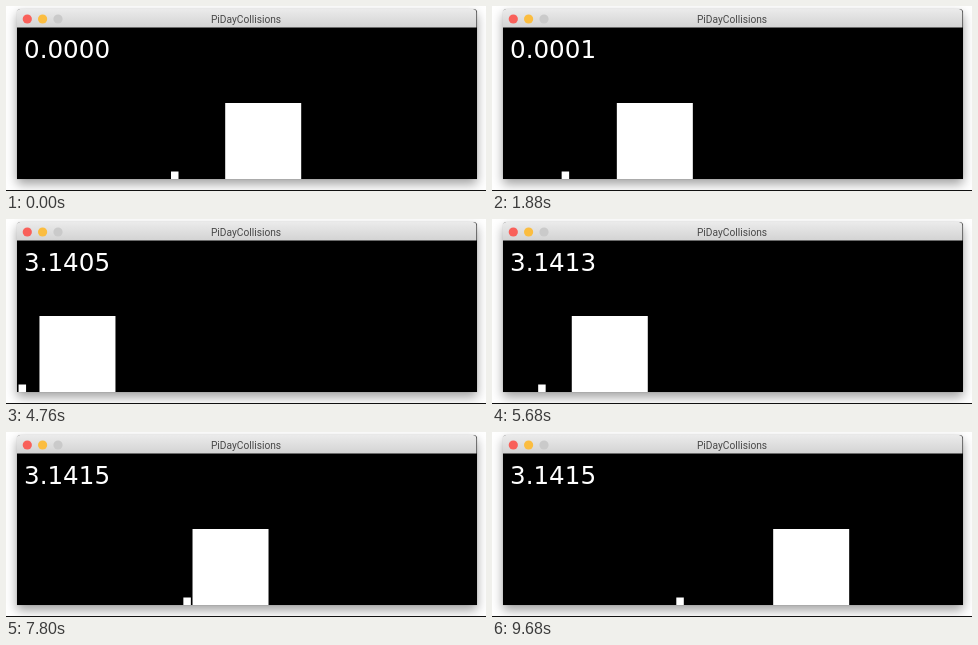
An HTML page that plays this animation: 480x185 px, repeating every 9.72 s.

```html
<!DOCTYPE html>
<html lang="en">
<head>
<meta charset="utf-8">
<title>PiDayCollisions</title>
<style>
  html, body { margin: 0; width: 100%; height: 100%; overflow: hidden; background: #fff; }
  #stage { position: relative; width: 480px; height: 185px; overflow: hidden; background: #fff; }
  #window {
    position: absolute; left: 10.5px; top: 3px; width: 460px; height: 170.4px;
    border-radius: 4px 4px 0 0; background: #000;
    box-shadow: 0 0 1px rgba(0, 0, 0, .35), 0 5px 11px rgba(0, 0, 0, .38);
  }
  #floor { position: absolute; left: 0; bottom: 0; width: 100%; height: 1px; background: #111; }
  svg { position: absolute; left: 0; top: 0; }
  #title { font: 10.2px Roboto, sans-serif; fill: #484848; }
  #count { font: 24.6px "DejaVu Sans", sans-serif; fill: #fff; }
</style>
</head>
<body>
<div id="stage">
  <div id="window"></div>
  <div id="floor"></div>
  <svg width="480" height="185" viewBox="0 0 480 185">
    <defs>
      <linearGradient id="bar" x2="0" y2="1">
        <stop stop-color="#ebebeb"/>
        <stop offset="1" stop-color="#d3d3d3"/>
      </linearGradient>
    </defs>
    <path d="M10.5 21.5V7q0-4 4-4h452q4 0 4 4v14.5z" fill="url(#bar)"/>
    <circle cx="21.3" cy="13" r="4.6" fill="#f9605a"/>
    <circle cx="36.6" cy="13" r="4.6" fill="#fbbd40"/>
    <circle cx="52" cy="13" r="4.6" fill="#cacaca"/>
    <text id="title" x="240" y="16.6" text-anchor="middle">PiDayCollisions</text>
    <text id="count" x="18" y="52.3">0.0000</text>
    <rect id="big" y="97" width="76" height="76" fill="#fff"/>
    <rect id="small" y="165.5" width="7.5" height="7.5" fill="#fff"/>
  </svg>
</div>
<script>
  const LOOP = 9720, STEP = 40;
  const WALL = 10.6, SIZE = 7.5;      // left wall, small block width
  const START = 154.4;                // small block's initial distance from the wall
  const ROOT = 1e4;                   // square root of the mass ratio
  const ALPHA = Math.atan(1 / ROOT);
  const V_IN = 0.0502, V_OUT = 0.05035;
  const T_IN = 4006, T_OUT = 4455, EDGE = 7;
  const TEXT_LAG = 17;

  const [big, small, count] = ["big", "small", "count"].map(id => document.getElementById(id));

  // Two-block billiard unfolded to a straight line: its polar angle gives the collision count.
  const angle = gap => Math.atan2(START, ROOT * gap);

  function state(t) {
    const first = T_IN - EDGE, last = T_OUT + EDGE;
    if (t <= first) {
      const gap = V_IN * (T_IN - t);
      return { gap, theta: angle(gap) };
    }
    if (t >= last) {
      const gap = V_OUT * (t - T_OUT);
      return { gap, theta: Math.PI - angle(gap) };
    }
    const a = angle(V_IN * EDGE);
    const theta = a + (Math.PI - 2 * a) * (t - first) / (last - first);
    return { gap: Math.max(0, V_IN * (T_IN - t), V_OUT * (t - T_OUT)), theta };
  }

  function draw(t) {
    const { gap, theta } = state(t);
    const turn = (theta / ALPHA) % 2;
    const fold = turn > 1 ? 2 - turn : turn;
    big.setAttribute("x", (WALL + SIZE + gap).toFixed(2));
    small.setAttribute("x", (WALL + gap * fold).toFixed(2));
    const hits = Math.floor(state(Math.max(0, t - TEXT_LAG)).theta / ALPHA);
    count.textContent = (hits / 1e4).toFixed(4);
  }

  const origin = performance.now();
  function tick() {
    const t = (performance.now() - origin) % LOOP;
    draw(Math.floor(t / STEP) * STEP);
    requestAnimationFrame(tick);
  }
  tick();
</script>
</body>
</html>
```
